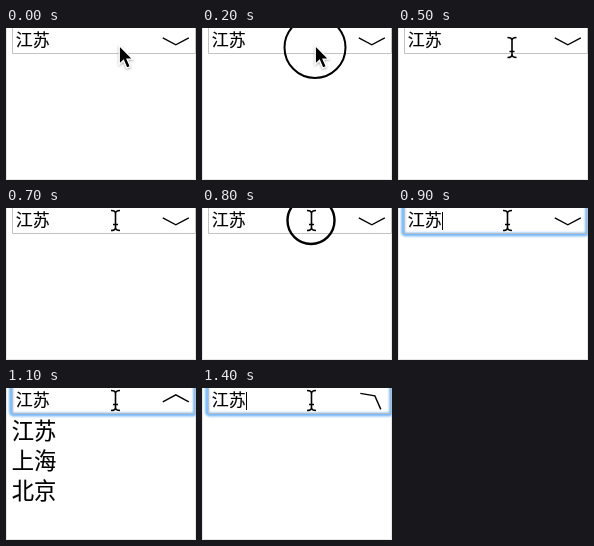
An HTML page that plays this animation: 190 by 152 pixels, repeating every 1.5 s.

```html
<!DOCTYPE html>
<html lang="zh-CN">
<head>
<meta charset="utf-8">
<style>
  html, body { margin: 0; width: 100%; height: 100%; overflow: hidden; background: #fff; }
  svg { display: block; width: 100%; height: 100%; }
  text { font-family: "Noto Sans CJK SC", "Noto Sans CJK", "Noto Sans CJK JP", sans-serif; stroke: #000; stroke-width: .15; }
  .line { fill: none; stroke: #000; }
</style>
</head>
<body>
<svg viewBox="0 0 190 152">
  <defs>
    <filter id="shadow" x="-50%" y="-50%" width="200%" height="200%">
      <feDropShadow dx="0" dy="1" stdDeviation="1" flood-opacity=".4"/>
    </filter>
    <filter id="glow" x="-10%" y="-30%" width="120%" height="160%">
      <feGaussianBlur stdDeviation=".8"/>
    </filter>
  </defs>
  <path d="M.5 0V151.5H189.5V0" fill="none" stroke="#e6e6e6"/>

  <rect id="focus" x="5" y="-8" width="184" height="34.5" rx="2" fill="none"
        stroke="#6bb1f7" stroke-width="3.4" filter="url(#glow)"/>
  <path d="M6.5 0V25.5H189.5V0" fill="none" stroke="#bdbdbd" stroke-opacity=".9"/>

  <text x="9.7" y="18" font-size="17">江苏</text>
  <path id="caret" class="line" d="M44.5 4V22"/>
  <path id="chevron" class="line" stroke-width="1.4" d="M-13-2L0 5L13-2"/>
  <g id="list" font-size="22.3">
    <text x="5.7" y="50.5">江苏</text>
    <text x="5.7" y="81">上海</text>
    <text x="5.7" y="111.3">北京</text>
  </g>

  <circle id="ripple" class="line"/>
  <path id="arrow" d="M113.3 17.5V36.2L117.5 32.3L120.8 40L124.3 38.5L121 31H126.7Z"
        stroke="#fff" stroke-width="1.2" filter="url(#shadow)"/>
  <g id="beam" class="line">
    <path d="M-4.5-10Q0-10 0-7Q0-10 4.5-10M0-7V7M-4.5 10Q0 10 0 7Q0 10 4.5 10M-2.5 4H2.5" stroke="#fff" stroke-width="3.4"/>
    <path d="M-4.5-10Q0-10 0-7Q0-10 4.5-10M0-7V7M-4.5 10Q0 10 0 7Q0 10 4.5 10M-2.5 4H2.5" stroke-width="1.6"/>
  </g>
</svg>
<script>
const LOOP = 1500;
const el = id => document.getElementById(id);
const show = (id, visible) => el(id).setAttribute("visibility", visible ? "visible" : "hidden");
const set = (id, attrs) => Object.entries(attrs).forEach(([k, v]) => el(id).setAttribute(k, v));

function chevronAngle(t) {
  if (t < 1000) return 0;
  if (t < 1100) return -38;
  return t < 1400 ? -180 : -142;
}

// Each click draws a ring around the pointer.
function clickRing(t) {
  if (t >= 100 && t < 200) return { cx: 113, cy: 19.5, r: 23, "stroke-width": 2.4 };
  if (t >= 200 && t < 300) return { cx: 113, cy: 19.5, r: 30.5, "stroke-width": 2 };
  if (t >= 800 && t < 900) return { cx: 109, cy: 12.5, r: 23.5, "stroke-width": 2.4 };
  return null;
}

function draw(now) {
  const t = Math.floor(now % LOOP / 100) * 100;
  const focused = t >= 900;
  const open = t >= 1000 && t < 1400;
  const ring = clickRing(t);

  show("focus", focused);
  show("caret", focused && !open);
  show("list", open);
  show("arrow", t < 300);
  show("beam", t >= 300);
  show("ripple", ring);
  if (ring) set("ripple", ring);
  set("beam", { transform: t < 700 ? "translate(114 19.5)" : "translate(109.5 12.5)" });
  set("chevron", { transform: `translate(169.8 11.8) rotate(${chevronAngle(t)})` });
}

function frame() {
  draw(performance.now());
  requestAnimationFrame(frame);
}
frame();
</script>
</body>
</html>
```
